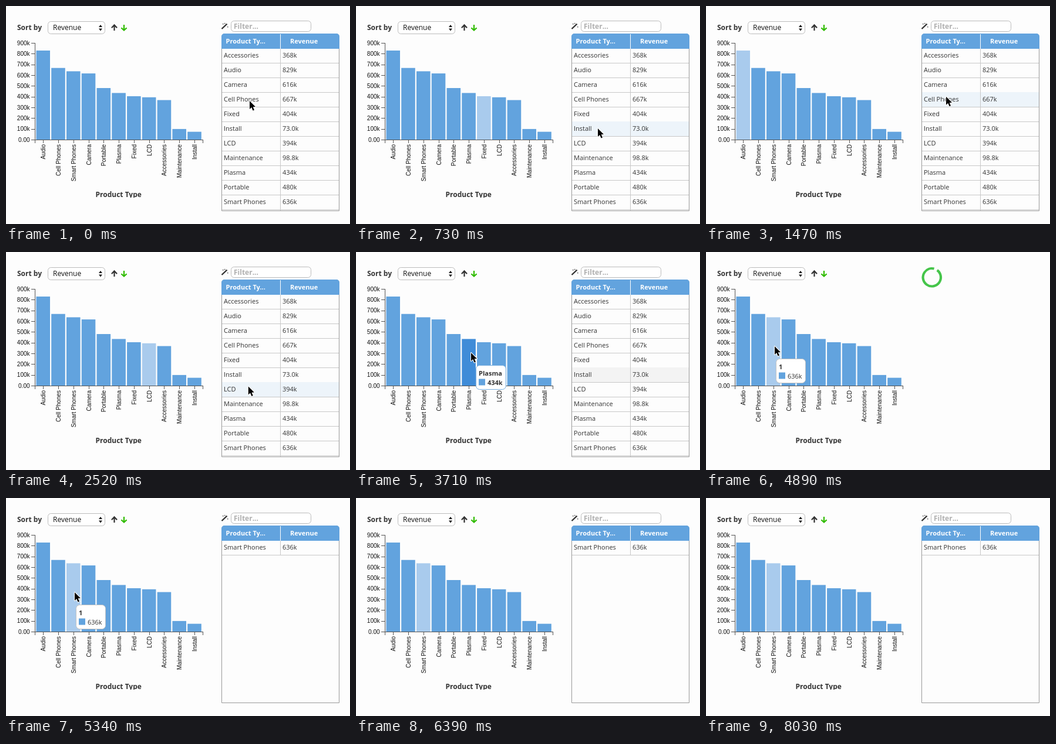
Recreate the animation shown at these times as an HTML page with a canvas. Size 586 by 372 pixels, loop 8.13 s.

```html
<!DOCTYPE html>
<html lang="en">
<head>
<meta charset="utf-8">
<title>Sales chart and table</title>
<style>
  html, body { margin: 0; width: 100%; height: 100%; overflow: hidden; background: #fdfdfd; }
  canvas { display: block; }
</style>
</head>
<body>
<canvas id="stage" width="586" height="372"></canvas>
<script>
const ctx = document.getElementById('stage').getContext('2d');
const LOOP = 8130, TICK = 150;
const BLUE = '#62a3de', LIGHT = '#a9cbed', DARK = '#3f8cd8', INK = '#333';
const SANS = '"Open Sans", sans-serif', ARIAL = '"Liberation Sans", Arial, sans-serif';

const bars = [
  ['Audio', 829], ['Cell Phones', 667], ['Smart Phones', 636], ['Camera', 616],
  ['Portable', 480], ['Plasma', 434], ['Fixed', 404], ['LCD', 394],
  ['Accessories', 368], ['Maintenance', 98.8], ['Install', 73]
].map(([name, value]) => ({ name, value, label: (value < 100 ? value.toFixed(1) : value) + 'k' }));
const rows = [...bars].sort((a, b) => a.name < b.name ? -1 : 1);
const find = name => bars.filter(b => b.name === name);

// Pointer way points: time, x, y
const path = [
  [0, 415, 162], [150, 414, 168], [600, 412, 209], [750, 412, 200], [1170, 410, 107],
  [1320, 409, 151], [1470, 409, 170], [2220, 413, 240], [2370, 413, 232], [2520, 412, 220],
  [3410, 196, 172], [4150, 196, 172], [4600, 117, 161], [5790, 117, 161], [5940, 165, 178],
  [6240, 447, 289], [7140, 533, 354], [7590, 268, 212], [8030, 540, 372]
];
const anchors = [0, 3410, 4300, 4890, 8030];

function snap(t) {
  const base = anchors.filter(a => a <= t).pop();
  return base + Math.floor((t - base) / TICK) * TICK;
}

function pointerAt(t) {
  const i = path.findIndex(p => p[0] > t);
  if (i < 1) return path[i < 0 ? path.length - 1 : 0].slice(1);
  const [t0, x0, y0] = path[i - 1], [t1, x1, y1] = path[i];
  const k = (t - t0) / (t1 - t0);
  return [x0 + (x1 - x0) * k, y0 + (y1 - y0) * k];
}

function rowAt(t) {
  if (t < TICK || t > 3410) return null;
  const [x, y] = pointerAt(t);
  return x > 367 ? rows[Math.floor((y - 72) / 25)] : null;
}

function text(str, x, y, font, color = INK, align = 'left') {
  ctx.font = font;
  ctx.fillStyle = color;
  ctx.textAlign = align;
  ctx.fillText(str, x, y);
}

function rect(x, y, w, h, color) {
  ctx.fillStyle = color;
  ctx.fillRect(x, y, w, h);
}

function roundBox(x, y, w, h, r, fill, stroke) {
  ctx.beginPath();
  ctx.roundRect(x, y, w, h, r);
  if (fill) { ctx.fillStyle = fill; ctx.fill(); }
  if (stroke) { ctx.strokeStyle = stroke; ctx.lineWidth = 1; ctx.stroke(); }
}

function shape(points, fill) {
  ctx.beginPath();
  points.forEach(([x, y]) => ctx.lineTo(x, y));
  ctx.closePath();
  ctx.fillStyle = fill;
  ctx.fill();
}

function sortArrow(x, dir, color) {
  ctx.strokeStyle = color;
  ctx.lineWidth = 2.2;
  ctx.beginPath();
  ctx.moveTo(x, 37 - 5 * dir);
  ctx.lineTo(x, 37 + 4 * dir);
  ctx.moveTo(x - 4.6, 37.2);
  ctx.lineTo(x, 37 + 4.6 * dir);
  ctx.lineTo(x + 4.6, 37.2);
  ctx.stroke();
}

function drawControls() {
  text('Sort by', 19, 41, 'bold 12px ' + SANS);
  roundBox(71.5, 26.5, 97, 21, 5, '#fff', '#bbb');
  text('Revenue', 80, 41, '12px ' + SANS, '#111');
  shape([[158, 36], [161, 32], [164, 36]], '#111');
  shape([[158, 38.5], [161, 42.5], [164, 38.5]], '#111');
  sortArrow(184.5, -1, INK);
  sortArrow(201, 1, '#2fbb00');
}

function drawChart(colorOf) {
  for (let i = 0; i < 10; i++) {
    const y = 228 - i * 165 / 9;
    text(i ? i * 100 + 'k' : '0.00', 40.5, y + 3.5, '10px ' + ARIAL, '#111', 'right');
    rect(43, Math.round(y), 6, 1, '#555');
  }
  bars.forEach((bar, i) => {
    const x = 51.4 + i * 25.78, mid = x + 11.8, h = bar.value * 165 / 900;
    rect(x, 228 - h, 23.6, h, colorOf(bar.name));
    rect(Math.round(mid), 228, 1, 6, '#555');
    ctx.save();
    ctx.translate(mid + 4, 236);
    ctx.rotate(-Math.PI / 2);
    text(bar.name, 0, 0, '10px ' + ARIAL, '#111', 'right');
    ctx.restore();
  });
  rect(49, 63, 1, 171, '#555');
  rect(49, 228, 287, 1, '#555');
  rect(335, 228, 1, 6, '#555');
  ctx.save();
  ctx.beginPath();
  ctx.rect(140, 310, 110, 17);
  ctx.clip();
  text('Product Type', 152.5, 326, 'bold 12px ' + SANS);
  ctx.restore();
}

function drawWand() {
  ctx.strokeStyle = INK;
  ctx.lineWidth = 2.4;
  ctx.beginPath();
  ctx.moveTo(367.5, 39);
  ctx.lineTo(376.5, 30.5);
  ctx.stroke();
  [[369, 30], [372, 29], [377, 35]].forEach(([x, y]) => rect(x, y, 1.4, 1.4, INK));
}

function drawTable(list, hovered, hoverColor) {
  drawWand();
  roundBox(383.5, 25.5, 136, 18, 5, '#fff', '#bbb');
  text('Filter...', 388, 39, 'bold 12px ' + SANS, '#b0b0b0');
  list.forEach((row, i) => {
    const y = 72 + i * 25;
    if (row === hovered) rect(368, y, 199, 25, hoverColor);
    text(row.name, 371, y + 16, '11px ' + SANS);
    text(row.label, 471, y + 16, '11px ' + SANS);
    rect(368, y + 25, 199, 1, '#c8c8c8');
    rect(467, y, 1, 25, '#c8c8c8');
  });
  if (list.length > 1) rect(467, 347, 1, 2, '#c8c8c8');
  roundBox(367.5, 47.5, 200, 302, [5, 5, 0, 0], null, '#999');
  roundBox(367, 47, 201, 26, [5, 5, 0, 0], BLUE);
  rect(467, 48, 1, 25, '#fff');
  text('Product Ty...', 374.5, 64, 'bold 11px ' + SANS, '#fff');
  text('Revenue', 484, 64, 'bold 11px ' + SANS, '#fff');
}

function drawSpinner(turn) {
  const start = -Math.PI * 0.3 + turn;
  ctx.strokeStyle = '#45c54a';
  ctx.lineWidth = 4.2;
  ctx.beginPath();
  ctx.arc(384.8, 43.3, 15.2, start, start + Math.PI * 1.88);
  ctx.stroke();
}

function drawTooltip(x, y, title, bar, active) {
  const bold = 'bold 11px ' + SANS;
  ctx.font = bold;
  const width = Math.max(50, ctx.measureText(title).width + 11);
  roundBox(x + 0.5, y + 0.5, width, 41, 6, '#fff', active ? '#78aede' : '#c4c4c4');
  text(title, x + 5, y + 18, bold);
  rect(x + 5, y + 23.5, 11, 11, BLUE);
  text(bar.label, x + 20, y + 34, active ? bold : '11px ' + SANS);
}

function drawPointer([x, y]) {
  ctx.save();
  ctx.translate(x, y);
  const outline = [[0, 0], [0, 14], [3.2, 11], [5.6, 16.5], [8, 15.4], [5.7, 10.2], [10, 10]];
  ctx.beginPath();
  outline.forEach(p => ctx.lineTo(...p));
  ctx.closePath();
  ctx.lineJoin = 'round';
  ctx.lineWidth = 2;
  ctx.strokeStyle = '#fff';
  ctx.stroke();
  ctx.fillStyle = '#000';
  ctx.fill();
  ctx.restore();
}

function draw(t) {
  const within = (from, to) => t >= from && t < to;
  const [plasma] = find('Plasma'), [smart] = find('Smart Phones');
  const active = within(3560, 3860) ? plasma : within(4600, 4890) ? smart : null;
  const selected = within(3860, 4890) ? plasma : t >= 4890 ? smart : rowAt(t - TICK);

  rect(0, 0, 586, 372, '#fdfdfd');
  drawControls();
  drawChart(name => name === active?.name ? DARK : name === selected?.name ? LIGHT : BLUE);

  if (within(3860, 4010) || within(4890, 5190)) {
    drawSpinner((t - 4890) / 1000 * Math.PI * 2);
  } else if (t < 3860) {
    const row = rowAt(t);
    const left = !row && t > 2520;
    drawTable(rows, left ? find('Install')[0] : row, left ? '#f3f3f3' : '#edf4fa');
  } else {
    drawTable([t < 4890 ? plasma : smart]);
  }

  if (within(3560, 4300)) drawTooltip(204, 193, active ? plasma.name : '1', plasma, !!active);
  if (within(4600, 5940)) drawTooltip(119, 182, active ? smart.name : '1', smart, !!active);
  if (!within(6390, 7140) && t < 8030) drawPointer(pointerAt(t));
}

const began = performance.now();
function frame() {
  draw(snap((performance.now() - began) % LOOP));
  requestAnimationFrame(frame);
}
frame();
</script>
</body>
</html>
```
